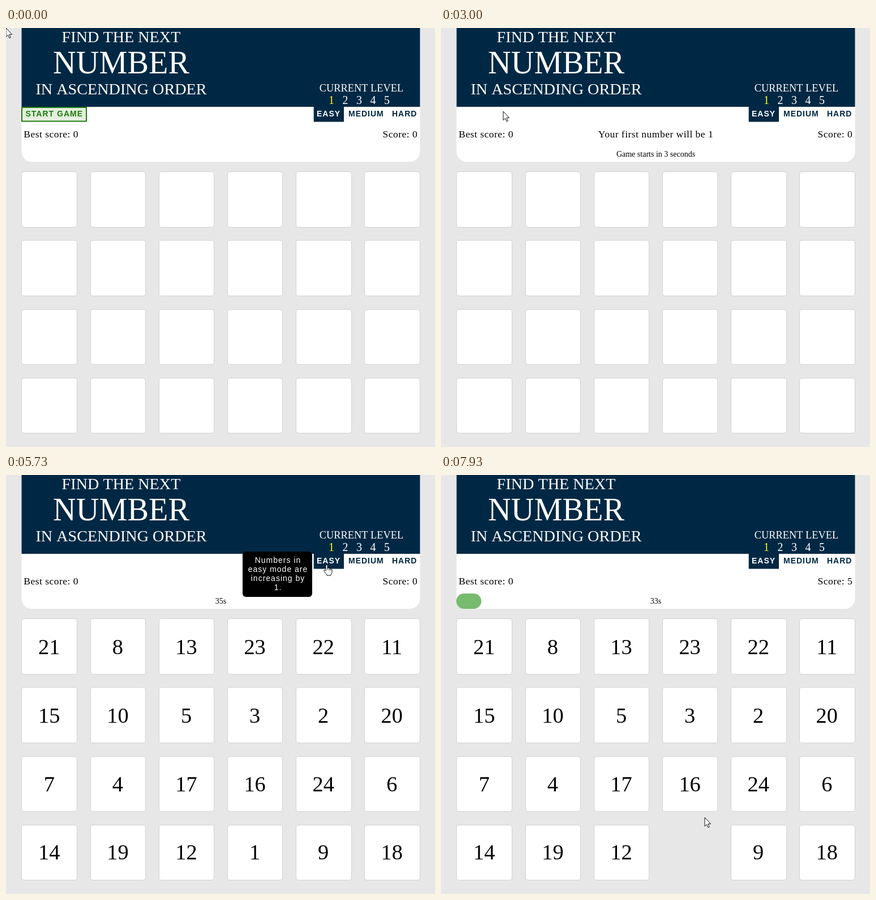
An HTML page with a canvas for the animation above (8 s loop, 758x739 px).

```html
<!DOCTYPE html>
<html lang="en">
<head>
<meta charset="utf-8">
<title>Find the next number</title>
<style>
html, body { margin: 0; width: 100%; height: 100%; overflow: hidden; background: #e7e7e7; }
canvas { display: block; }
</style>
</head>
<body>
<canvas id="stage" width="758" height="739"></canvas>
<script>
const ctx = document.getElementById('stage').getContext('2d');
const LOOP = 8000;
const SERIF = '"Liberation Serif", "Times New Roman", serif';
const SANS = '"Liberation Sans", Arial, sans-serif';
const NAVY = '#002844', GREEN = '#1c7c0c', PALE = '#e4efde';
const LEFT = 27.5, WIDTH = 704, MID = 379.5, PITCH = 121.1;
const BOARD = '21 8 13 23 22 11 15 10 5 3 2 20 7 4 17 16 24 6 14 19 12 1 9 18'.split(' ');

// Moments of the round, in ms
const HOVER = 1330, START = 2730, TIP_ON = 3430, PLAY = 5730, TIP_OFF = 6740, TILE = 7510, HIT = 7700;

// Pointer moves; each starts where the last one ended
const MOVES = [
  { from: 470, to: 1270, x: 123, y: 145 },
  { from: HOVER, to: 1600, x: 108, y: 147 },
  { from: 3000, to: 3800, x: 568, y: 157, power: 3.5, bow: 6 },
  { from: 5200, to: 5500, x: 566.5, y: 158 },
  { from: 6670, to: 6870, x: 559, y: 177.5 },
  { from: 6870, to: 7470, x: 462, y: 610 },
  { from: 7470, to: HIT, x: 454, y: 634 },
  { from: HIT, to: 7930, x: 466, y: 604 }
];

const ARROW = new Path2D('M0 0V15.5L3.6 12.2L6 17.8L8.2 16.8L5.9 11.3H10.5Z');
const HAND = new Path2D('M4 11.5V2Q5.5 0 7 2V7Q8.5 5.5 10 7.5Q11.5 6.5 12.5 8.5Q15 8 15 10.5V14' +
  'Q14.5 17 13 18V19.7H6V18.5Q3 15 .8 11.5Q.5 9.5 2.5 10ZM7 7V10M10 8V10.5M12.5 9V11');

const clamp = v => Math.max(0, Math.min(1, v));
const between = (t, a, b) => t >= a && t < b;

function text(str, x, y, font, color, align = 'left', spacing = 0) {
  ctx.font = font;
  ctx.fillStyle = color;
  ctx.textAlign = align;
  ctx.letterSpacing = spacing + 'px';
  ctx.fillText(str, x, y);
}

function rect(x, y, w, h, color, radius = 0) {
  ctx.fillStyle = color;
  ctx.beginPath();
  ctx.roundRect(x, y, w, h, radius);
  ctx.fill();
}

const title = (str, y, size) => text(str, 203.5, y, `${size}px ${SERIF}`, '#fff', 'center');
const label = (str, x, color) => text(str, x, 156, `bold 14px ${SANS}`, color, 'left', 1);
const info = (str, x, align) => text(str, x, 193, `17.6px ${SERIF}`, '#000', align, 0.45);
const small = str => text(str, MID, 227, `14px ${SERIF}`, '#000', 'center');

function drawHeader() {
  rect(LEFT, 0, WIDTH, 236, '#fff', [0, 0, 18, 18]);
  rect(LEFT, 0, WIDTH, 139, NAVY);
  title('FIND THE NEXT', 25, 28.2);
  title('NUMBER', 80, 56.3);
  title('IN ASCENDING ORDER', 117, 28.2);
  text('CURRENT LEVEL', 628, 112, `18.4px ${SERIF}`, '#fff', 'center');
  for (let i = 0; i < 5; i++) {
    text(i + 1, 575 + i * 24.5, 134, `20px ${SERIF}`, i ? '#fff' : '#ff0', 'center');
  }
  rect(543.7, 139, 53.3, 26.5, NAVY);
  label('EASY', 549, '#fff');
  label('MEDIUM', 605, NAVY);
  label('HARD', 682, NAVY);
}

function drawButton(t) {
  if (t >= START) return;
  if (t < HOVER) {
    rect(27, 139, 116, 26.5, GREEN);
    rect(29, 141, 112, 22.5, PALE);
    label('START GAME', 34.5, GREEN);
    return;
  }
  // Hover fades the fill and the letters in opposite directions
  const fade = Math.round(100 * clamp((t - HOVER) / 270));
  rect(27, 139, 112, 26.5, `color-mix(in srgb, ${GREEN} ${fade}%, ${PALE})`);
  label('START GAME', 32.5, `color-mix(in srgb, #fff ${fade}%, ${GREEN})`);
}

function drawStatus(t) {
  info('Best score: 0', 31.3, 'left');
  info('Score: ' + (t < HIT ? 0 : 5), 727.3, 'right');
  if (t < START) return;
  if (t < PLAY) {
    info('Your first number will be 1', MID, 'center');
    small(`Game starts in ${3 - Math.floor((t - START) / 1000)} seconds`);
    return;
  }
  const sec = (t - PLAY) / 1000;
  const w = WIDTH * sec / 35;
  rect(27, 209, w, 27, '#77bb6e', Math.min(w / 2, 13.5));
  small(35 - Math.floor(sec) + 's');
}

function drawBoard(t) {
  BOARD.forEach((n, i) => {
    if (n === '1' && t >= HIT) return;
    const col = i % 6, row = Math.floor(i / 6);
    const left = 27.3 + col * 121.2, top = 253.3 + row * PITCH;
    const x = Math.round(left), y = Math.round(top);
    const w = Math.round(left + 98.4) - x, h = Math.round(top + 98.4) - y;
    rect(x, y, w, h, '#d2d2d2', 5);
    rect(x + 1, y + 1, w - 2, h - 2, '#fff', 4);
    if (t >= PLAY) text(n, 76.3 + col * PITCH, 316 + row * 120.8, `38.4px ${SERIF}`, '#000', 'center');
  });
}

function drawTip(t) {
  if (!between(t, TIP_ON, TIP_OFF)) return;
  rect(418, 135, 123, 80, '#000', 6);
  ['Numbers in', 'easy mode are', 'increasing by', '1.'].forEach((line, i) =>
    text(line, 480.5, 155 + i * 16, `14px ${SANS}`, '#fff', 'center', 1));
}

function pointerAt(t) {
  let x = 0, y = 0;
  for (const { from, to, x: toX, y: toY, power = 1.2, bow = 0 } of MOVES) {
    const k = clamp((t - from) / (to - from));
    const ease = 1 - (1 - k) ** power;
    x += (toX - x) * ease;
    y += (toY - y) * ease + bow * Math.sin(Math.PI * k);
  }
  return [x, y];
}

function drawPointer(t) {
  const [x, y] = pointerAt(t);
  const hand = between(t, HOVER, START) || between(t, TIP_ON, TIP_OFF) || between(t, TILE, HIT);
  const shape = hand ? HAND : ARROW;
  ctx.save();
  ctx.translate(hand ? x - 5.5 : x, hand ? y - 0.5 : y);
  ctx.fillStyle = '#fff';
  ctx.strokeStyle = '#111';
  ctx.lineWidth = 1;
  ctx.fill(shape);
  ctx.stroke(shape);
  ctx.restore();
}

function frame() {
  const t = (performance.now() - begin) % LOOP;
  rect(0, 0, 758, 739, '#e7e7e7');
  drawHeader();
  drawButton(t);
  drawStatus(t);
  drawBoard(t);
  drawTip(t);
  drawPointer(t);
  requestAnimationFrame(frame);
}

const begin = performance.now();
frame();
</script>
</body>
</html>
```
